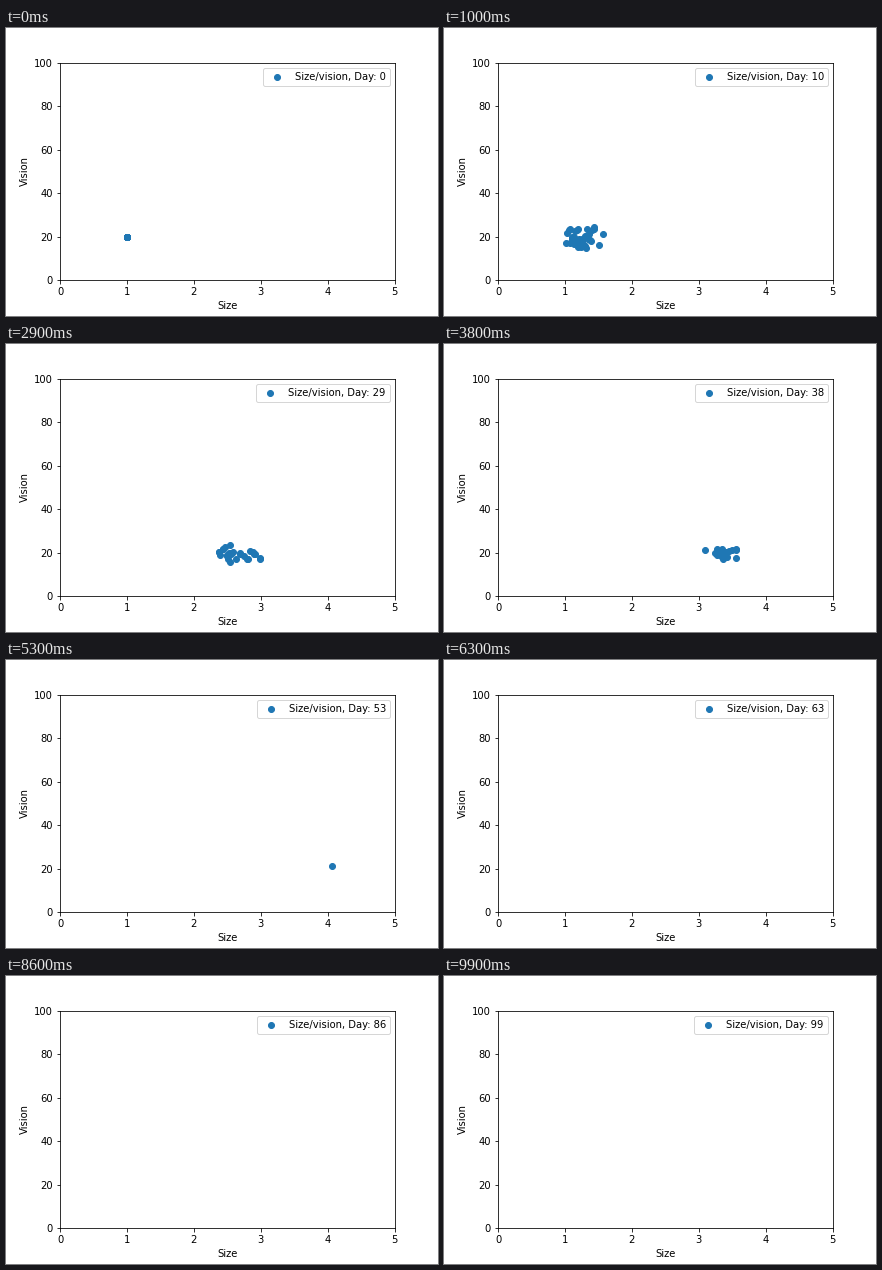
Recreate the animation shown at these times as a matplotlib script. Size 432 by 288 pixels, loop 10 s.

```python
import math
import random

import matplotlib.pyplot as plt
import numpy as np
from matplotlib.animation import FuncAnimation

DAYS = 100
START = (1.0, 20.0)
LAST = (4.06, 21.0)

# Key points of the evolution
DAY = [0, 10, 19, 29, 38, 49]
SIZE = [1.0, 1.22, 1.67, 2.57, 3.35, 3.95]
SIZE_SPREAD = [0.05, 0.25, 0.28, 0.42, 0.22, 0.2]
VISION_SPREAD = [1.0, 5.0, 6.5, 4.4, 2.6, 2.0]
POPULATION = [30, 36, 42, 27, 17, 1]


def trend(day, values):
    return float(np.interp(day, DAY, values))


def alive(creatures, day):
    return [(size, vision) for size, vision, born, dies in creatures if born <= day < dies]


def mutant(born, rng):
    """A creature from an elliptical cloud around the trend at its mid-life."""
    life = rng.randint(2, 5)
    mid = born + life / 2
    r, angle = math.sqrt(rng.random()), rng.uniform(0, math.tau)
    size = trend(mid, SIZE) + trend(mid, SIZE_SPREAD) * r * math.cos(angle)
    vision = 19.5 + trend(mid, VISION_SPREAD) * r * math.sin(angle)
    return size, vision, born, born + life


def simulate(seed=7):
    rng = random.Random(seed)
    # all creatures start alike; mutants gradually replace them
    creatures = [(*START, 0, rng.randint(2, 9)) for _ in range(POPULATION[0])]
    creatures.append((*LAST, DAY[-1], 57))
    for day in range(1, DAY[-1]):
        missing = round(trend(day, POPULATION)) - len(alive(creatures, day))
        creatures += [mutant(day, rng) for _ in range(missing)]
    return creatures


creatures = simulate()

fig, ax = plt.subplots(figsize=(6, 4), dpi=72)
fig.subplots_adjust(left=0.125, right=0.9, bottom=0.125, top=0.88)
ax.set(xlim=(0, 5), ylim=(0, 100), xlabel="Size", ylabel="Vision")
dots = ax.scatter([], [], color="#1f77b4")


def update(day):
    dots.set_offsets(np.array(alive(creatures, day)).reshape(-1, 2))
    ax.legend([dots], [f"Size/vision, Day: {day}"], loc="upper right")
    return (dots,)


anim = FuncAnimation(fig, update, frames=DAYS, interval=100, repeat=True, repeat_delay=0)
plt.show()
```
